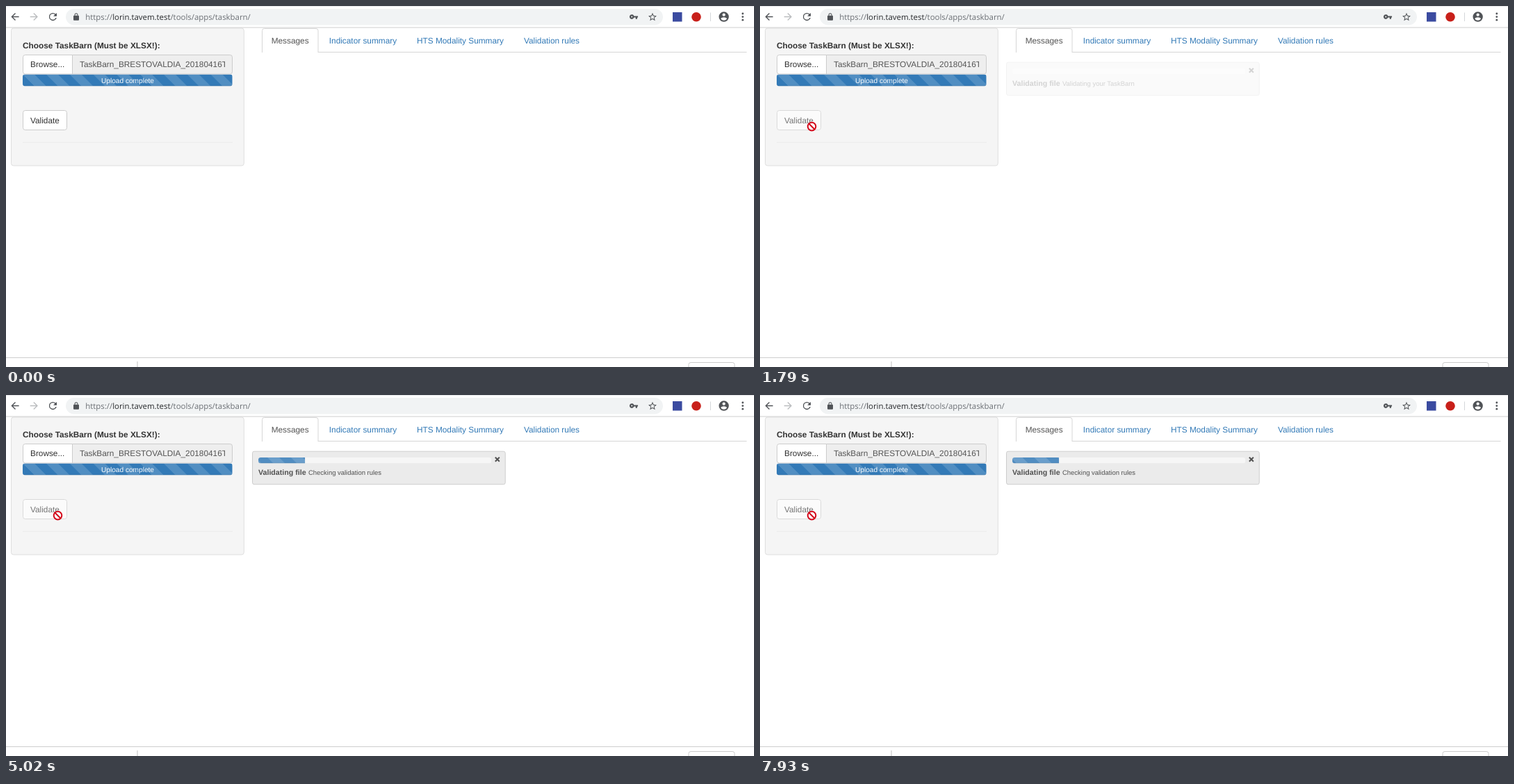
Animation of 1076 by 520 pixels, one loop 8000 ms. Source, as an HTML page:

```html
<!DOCTYPE html>
<html lang="en">
<head>
<meta charset="utf-8">
<title>File validation</title>
<style>
  html, body { margin: 0; width: 100%; height: 100%; overflow: hidden; background: #fff; }
  svg { display: block; }
  text { font: 11.83px "Liberation Sans", Arial, sans-serif; fill: #333; text-rendering: geometricPrecision; white-space: pre; }
  .bold { font-weight: bold; }
  .link { fill: #337ab7; }
  .muted { fill: #555; }
  .address { font: 11.4px "Open Sans", "Noto Sans", sans-serif; fill: #6b6f74; }
  .address .host { fill: #26282b; }
  .icon { fill: #505357; fill-rule: evenodd; }
  .edge { fill: none; stroke: #ccc; }
</style>
</head>
<body>
<svg width="1076" height="520" viewBox="0 0 1076 520">
  <defs>
    <pattern id="stripes" width="33.8" height="60" patternUnits="userSpaceOnUse" patternTransform="translate(24 98.5) skewX(45)">
      <rect width="16.9" height="60" fill="#fff" fill-opacity=".15"/>
    </pattern>
    <pattern id="movingStripes" width="33.8" height="60" patternUnits="userSpaceOnUse">
      <rect width="16.9" height="60" fill="#fff" fill-opacity=".15"/>
    </pattern>
    <clipPath id="uploadClip"><rect x="24" y="98.5" width="301.7" height="17" rx="3.4"/></clipPath>
    <clipPath id="trackClip"><rect x="363" y="90" width="335.3" height="8.45" rx="3.4"/></clipPath>
    <clipPath id="fieldClip"><rect x="96" y="71" width="219" height="27"/></clipPath>
  </defs>
  <rect width="1076" height="520" fill="#fff"/>

  <!-- side panel -->
  <rect x="7.5" y="32" width="334.8" height="198" rx="3.4" fill="#f5f5f5" stroke="#dedede"/>
  <text class="bold" x="24" y="61">Choose TaskBarn (Must be XLSX!):</text>
  <path d="M95.5 70.5H322.3q3.2 0 3.2 3.2V94.8q0 3.2-3.2 3.2H95.5z" fill="#eee" stroke="#ccc"/>
  <path d="M95.5 70.5H27.7q-3.2 0-3.2 3.2V94.8q0 3.2 3.2 3.2H95.5z" fill="#fff" stroke="#ccc"/>
  <text x="35" y="88">Browse...</text>
  <g clip-path="url(#fieldClip)"><text class="muted" x="106" y="88">TaskBarn_BRESTOVALDIA_20180416T</text></g>
  <g clip-path="url(#uploadClip)">
    <rect x="24" y="98.5" width="301.7" height="17" fill="#337ab7"/>
    <rect x="24" y="98.5" width="301.7" height="17" fill="url(#stripes)"/>
    <rect x="24" y="114.65" width="301.7" height=".85" fill-opacity=".15"/>
  </g>
  <text x="175" y="110.7" text-anchor="middle" style="font-size:10.14px;fill:#fff">Upload complete</text>
  <g id="button">
    <rect id="face" x="24.5" y="150.5" width="63" height="28" rx="3.2" fill="#fff" stroke="#ccc"/>
    <text x="35" y="168.7">Validate</text>
  </g>
  <rect id="ring" x="24.4" y="150.2" width="63.6" height="28.7" rx="1" fill="none" stroke="#7b9ddb" stroke-width="1.8"/>
  <path d="M24 196.4H326" stroke="#ebebeb"/>

  <!-- tabs -->
  <path d="M449 66.5H1065.5" stroke="#d6d6d6"/>
  <path d="M368.5 67V35.5q0-3 3-3H446q3 0 3 3V67" fill="#fff" stroke="#d6d6d6"/>
  <text class="muted" x="381.7" y="53.6">Messages</text>
  <text class="link" x="464.8" y="53.6">Indicator summary</text>
  <text class="link" x="591" y="53.6">HTS Modality Summary</text>
  <text class="link" x="745" y="53.6">Validation rules</text>

  <!-- notification -->
  <g id="notice">
    <rect x="354.5" y="81.2" width="363.7" height="47.5" rx="2.5" fill="#e8e8e8" stroke="#c4c4c4"/>
    <g clip-path="url(#trackClip)">
      <rect x="363" y="90" width="335.3" height="8.45" fill="#f5f5f5"/>
      <g id="bar">
        <rect class="fill" x="363" y="90" height="8.45" fill="#337ab7"/>
        <rect class="fill" x="363" y="90" height="8.45" fill="url(#movingStripes)"/>
        <rect class="fill" x="363" y="97.6" height=".85" fill-opacity=".15"/>
      </g>
    </g>
    <path d="M703.8 89.8l6 6m0-6l-6 6" stroke="#333" stroke-width="2"/>
    <text class="bold" x="363" y="115" style="font-size:10.65px">Validating file</text>
    <text id="detail" x="435" y="115" style="font-size:9.46px"></text>
  </g>

  <!-- browser toolbar -->
  <rect width="1076" height="31" fill="#fff"/>
  <path d="M0 .5H1076" stroke="#e6e7e9"/>
  <path d="M0 31H1076" stroke="#cfcfcf"/>
  <rect x="86" y="4" width="859" height="23.5" rx="11.75" fill="#f1f3f4"/>
  <g class="icon">
    <path transform="translate(4.6 7.1) scale(.7)" d="M20 11H7.83l5.59-5.59L12 4l-8 8 8 8 1.41-1.41L7.83 13H20z"/>
    <path transform="translate(31.9 7.1) scale(.7)" fill="#bbbdbf" d="M12 4l-1.41 1.41L16.17 11H4v2h12.17l-5.58 5.59L12 20l8-8z"/>
    <path transform="translate(59 7.1) scale(.7)" d="M17.65 6.35A8 8 0 1 0 19.73 14h-2.08A6 6 0 1 1 12 6c1.66 0 3.14.69 4.22 1.78L13 11h7V4z"/>
    <path transform="translate(95 9.8) scale(.5)" d="M18 8h-1V6A5 5 0 0 0 7 6v2H6a2 2 0 0 0-2 2v10a2 2 0 0 0 2 2h12a2 2 0 0 0 2-2V10a2 2 0 0 0-2-2zM8.9 6a3.1 3.1 0 0 1 6.2 0v2H8.9z"/>
    <path transform="translate(896.4 8.9) scale(.55)" d="M12.65 10A6 6 0 1 0 12.65 14H17v4h4v-4h2v-4zM7 14a2 2 0 1 1 0-4 2 2 0 0 1 0 4z"/>
    <path transform="translate(922.8 8.6) scale(.6)" d="M22 9.24l-7.19-.62L12 2 9.19 8.63 2 9.24l5.46 4.73L5.82 21 12 17.27 18.18 21l-1.63-7.03zM12 15.4l-3.76 2.27 1-4.28-3.32-2.88 4.38-.38L12 6.1l1.71 4.04 4.38.38-3.32 2.88 1 4.28z"/>
    <path transform="translate(1024 6.9) scale(.72)" d="M12 2a10 10 0 1 0 0 20 10 10 0 0 0 0-20zm0 3a3 3 0 1 1 0 6 3 3 0 0 1 0-6zm0 14.2a7.2 7.2 0 0 1-6-3.22c.03-2 4-3.08 6-3.08s5.97 1.1 6 3.08A7.2 7.2 0 0 1 12 19.2z"/>
    <circle cx="1059.8" cy="11" r="1.4"/><circle cx="1059.8" cy="15.6" r="1.4"/><circle cx="1059.8" cy="20.2" r="1.4"/>
  </g>
  <text class="address" x="114.3" y="20">https://<tspan class="host">lorin.tavem.test</tspan>/tools/apps/taskbarn/</text>
  <rect x="959" y="9" width="13.5" height="13.5" fill="#3b4ba0"/>
  <circle cx="993" cy="15.7" r="6.8" fill="#c8201a"/>
  <path d="M1013.5 9.5V22" stroke="#d4d6d9"/>

  <!-- bottom edge -->
  <path class="edge" d="M0 506.6H1076"/>
  <path class="edge" stroke-width="1.2" d="M189 512V520"/>
  <path class="edge" d="M982 521V516.5q0-3 3-3H1045q3 0 3 3V521"/>

  <!-- pointers -->
  <path id="arrow" d="M0 0V15.5L3.6 12.2 6 17.6 8.4 16.6 6 11.4H11z" fill="#fff" stroke="#000" stroke-width=".9"/>
  <path id="hand" d="M5.5 1.5q1.5-1.4 3 0V7q1.4-1 2.6.4q1.6-.8 2.5.6q1.9-.5 2.4 1.2V14q0 2.5-1.6 4V21H7V19L1.2 12.5q-.8-1.6.8-2.2q1-.2 2 1l1.5 1.5zM8.5 7V11M11.1 7.4V11M13.6 8V11" fill="#fff" stroke="#222" stroke-width="1.1"/>
  <g id="blocked" fill="none" stroke="#d40a1c" stroke-width="2">
    <circle r="5.8" fill="#fff" fill-opacity=".6"/>
    <path d="M-4.1-4.1L4.1 4.1"/>
  </g>
</svg>
<script>
const LOOP = 8000, DISABLE = 1710, TICK = 76.8, NOTICE = 1786, FIRST = 1880, SECOND = 3655;
const TRACK = 335.3, PERIOD = 33.8, SCALE = { arrow: 0.92, hand: 0.83, blocked: 1 };
const $ = id => document.getElementById(id);
const fills = document.querySelectorAll(".fill");

// time, pointer, x, y
const pointerKeys = [
  [600, "arrow", 554, 431], [680, "arrow", 300, 291], [760, "arrow", 118, 191],
  [1150, "arrow", 98, 185], [1230, "hand", 72, 174], [1310, "hand", 69.4, 173.6],
  [DISABLE, "blocked", 74.5, 173.6]
];
// time, face, border, focus ring
const buttonKeys = [
  [0, "#fff", "#ccc", 0], [1230, "#e6e6e6", "#adadad", 0], [1400, "#d4d4d4", "#8c8c8c", 1],
  [1480, "#e6e6e6", "#adadad", 1], [DISABLE, "#fff", "#ccc", 0]
];

const clamp = v => Math.min(1, Math.max(0, v));
const latest = (keys, t) => keys.filter(k => k[0] <= t).pop();

// cubic-bezier(.25, .1, .25, 1)
function ease(x) {
  const curve = (s, a, b) => 3 * (1 - s) ** 2 * s * a + 3 * (1 - s) * s * s * b + s ** 3;
  let lo = 0, hi = 1;
  for (let i = 0; i < 24; i++) {
    const mid = (lo + hi) / 2;
    if (curve(mid, 0.25, 0.25) < x) lo = mid; else hi = mid;
  }
  return curve(hi, 0.1, 1);
}

function drawPointer(t) {
  const key = latest(pointerKeys, t);
  for (const id in SCALE) {
    const on = key && key[1] === id;
    $(id).setAttribute("visibility", on ? "visible" : "hidden");
    if (on) $(id).setAttribute("transform", `translate(${key[2]} ${key[3]}) scale(${SCALE[id]})`);
  }
}

function drawButton(t) {
  const [, face, border, focus] = latest(buttonKeys, t);
  $("face").setAttribute("fill", face);
  $("face").setAttribute("stroke", border);
  $("ring").setAttribute("opacity", focus);
  $("button").setAttribute("opacity", t >= DISABLE ? 0.65 : 1);
}

function drawNotice(t) {
  const now = DISABLE + Math.floor((t - DISABLE + 5) / TICK) * TICK;
  $("notice").setAttribute("opacity", 0.85 * clamp((now - NOTICE + 60) / 250));
  if (now < NOTICE) {
    $("notice").setAttribute("opacity", 0);
    return;
  }
  const share = 0.1 * ease(clamp((now - FIRST) / 600)) + 0.1 * ease(clamp((now - SECOND) / 600));
  fills.forEach(f => f.setAttribute("width", TRACK * share));
  const shift = PERIOD * (1 - ((now - NOTICE) % 2000) / 2000);
  $("movingStripes").setAttribute("patternTransform", `translate(${363 + shift} 90) skewX(45)`);
  $("detail").textContent = now < SECOND ? "Validating your TaskBarn" : "Checking validation rules";
}

function draw(t) {
  drawPointer(t);
  drawButton(t);
  drawNotice(t);
}

const start = performance.now();
function frame() {
  draw((performance.now() - start) % LOOP);
  requestAnimationFrame(frame);
}
frame();
</script>
</body>
</html>
```
